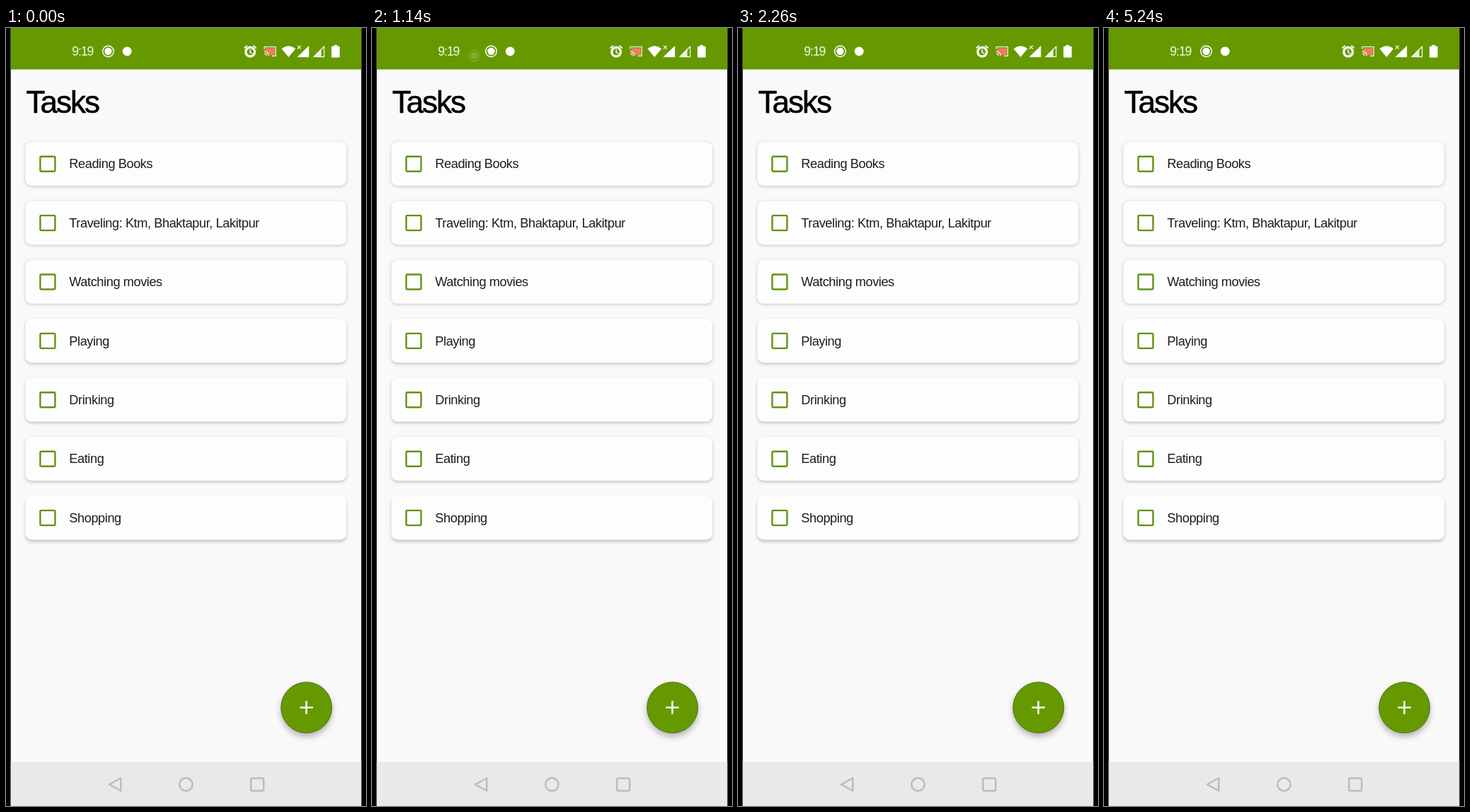
Animation of 509 by 1100 pixels, one loop 8000 ms. Source, as an HTML page:

```html
<!DOCTYPE html>
<html lang="en">
<head>
<meta charset="utf-8">
<title>Tasks</title>
<style>
  html, body { margin: 0; width: 100%; height: 100%; overflow: hidden; background: #000; }
  svg { display: block; width: 100%; height: 100%; }
  text { font-family: "Liberation Sans", Arial, sans-serif; }
  .label { font-size: 18.2px; letter-spacing: -.42px; fill: #1c1c1c; }
  .title { font-size: 44px; letter-spacing: -2px; fill: #000; stroke: #000; stroke-width: .6; }
  .clock { font-size: 17.5px; letter-spacing: -1px; fill: #f4f8ea; }
  .card { fill: #fdfdfd; }
  .box { fill: none; stroke: #629312; stroke-width: 2.4; }
  .fab { fill: #690; stroke: #3f6200; stroke-width: .8; filter: drop-shadow(0 5px 4px rgba(0, 0, 0, .28)); }
  .nav { fill: none; stroke: #bcbcbc; stroke-width: 2.5; stroke-linejoin: round; }
  .line { fill: none; stroke: #fff; }
</style>
</head>
<body>
<svg viewBox="0 0 509 1100">
  <defs>
    <g id="record">
      <circle r="7.8" class="line" stroke-width="1.4"/>
      <circle r="5.2" fill="#fff"/>
    </g>
  </defs>
  <rect width="509" height="1100"/>
  <rect x="6.7" width="495.6" height="1100" fill="#f9f9fa"/>
  <rect x="6.7" width="495.6" height="58.6" fill="#690"/>
  <rect x="6.7" y="1037.5" width="495.6" height="62.5" fill="#e9e9e9"/>

  <text class="clock" x="93.3" y="39.3">9:19</text>
  <use href="#record" id="newIcon"/>
  <use href="#record" id="oldIcon"/>
  <circle id="appIcon" r="6.5" fill="#fff"/>

  <!-- alarm, cast, wifi, two signals, battery -->
  <g class="line">
    <circle cx="345.3" cy="33.8" r="6.4" stroke-width="3.2"/>
    <path d="M345.3 30v4.3l3 2" stroke-width="1.5"/>
    <path d="M336.8 28.6l4.2-3.6M353.8 28.6l-4.2-3.6" stroke-width="2"/>
  </g>
  <rect x="367" y="28.5" width="13" height="9.5" fill="#f47c5c"/>
  <path fill="none" stroke="#f0eed8" stroke-width="1.3" d="M365.2 30v-3.3h16.2v12.8h-5.5M365 33a6.5 6.5 0 0 1 6.5 6.5M365 36.2a3.3 3.3 0 0 1 3.3 3.3"/>
  <g fill="#fff">
    <path d="M389.6 29.3Q399.5 21.5 409.4 29.3L399.5 41.3Z"/>
    <path d="M428.3 25V41.3H411.6Z"/>
    <path d="M445.8 29.2V40.5H434.8Z" opacity=".85"/>
    <path d="M463.8 25.8V24h4.4v1.8h2.4q1.2 0 1.2 1.2v13.6q0 1.2-1.2 1.2h-9.2q-1.2 0-1.2-1.2V27q0-1.2 1.2-1.2Z"/>
  </g>
  <path class="line" d="M449.8 26.2V40.6H435.3Z" stroke-width="1.2"/>
  <path class="line" d="M412.3 24.8l4.6 4.8m0-4.8l-4.6 4.8" stroke-width="1.2"/>

  <text class="title" x="28.5" y="119.8">Tasks</text>
  <g id="list"></g>

  <circle class="fab" cx="424.8" cy="960.8" r="36"/>
  <path class="line" d="M415.5 960.8h18.4M424.7 951.6v18.4" stroke-width="2.6"/>

  <g class="nav">
    <path d="M145.8 1069.5L162.3 1060.5V1078.5Z"/>
    <circle cx="254.5" cy="1069.5" r="9.2"/>
    <rect x="346.3" y="1060.7" width="18" height="17.8" rx="2"/>
  </g>
</svg>
<script>
const LOOP = 8000, ICON_Y = 33, SLOTS = [144.5, 171.2, 198];
const tasks = ["Reading Books", "Traveling: Ktm, Bhaktapur, Lakitpur", "Watching movies",
  "Playing", "Drinking", "Eating", "Shopping"];
const byId = id => document.getElementById(id);

// Shadows reach further down the lower a card sits.
const shadow = i => `drop-shadow(0 ${1.2 + i * .3}px 2px rgba(30, 30, 60, .25))`;

byId("list").innerHTML = tasks.map((task, i) => `
  <g transform="translate(0 ${(i * 83.4).toFixed(1)})">
    <rect class="card" x="27.3" y="161" width="454" height="62" rx="9" style="filter: ${shadow(i)}"/>
    <rect class="box" x="48.4" y="181.7" width="21" height="21" rx="1.2"/>
    <text class="label" x="89.3" y="198.4">${task}</text>
  </g>`).join("");

const progress = (t, from, to) => Math.min(1, Math.max(0, (t - from) / (to - from)));
const easeOut = p => 1 - (1 - p) ** 3;
const mix = (a, b, p) => a + (b - a) * p;

function place(id, x, y = ICON_Y, opacity = 1) {
  const icon = byId(id);
  icon.setAttribute("transform", `translate(${x} ${y})`);
  icon.setAttribute("opacity", opacity);
}

function draw(t) {
  const shift = easeOut(progress(t, 960, 1300));
  const rise = easeOut(progress(t, 1060, 1400));
  const fadeIn = progress(t, 1060, 1480);
  const leave = progress(t, 1980, 2260);
  const back = easeOut(leave);

  place("newIcon", SLOTS[0], mix(ICON_Y + 14, ICON_Y, rise), fadeIn);
  place("oldIcon", mix(SLOTS[0], SLOTS[1], shift), ICON_Y + 14 * back, 1 - leave);
  place("appIcon", mix(SLOTS[1], SLOTS[2], shift - back));
}

const start = performance.now();
function tick() {
  draw((performance.now() - start) % LOOP);
  requestAnimationFrame(tick);
}
tick();
</script>
</body>
</html>
```
